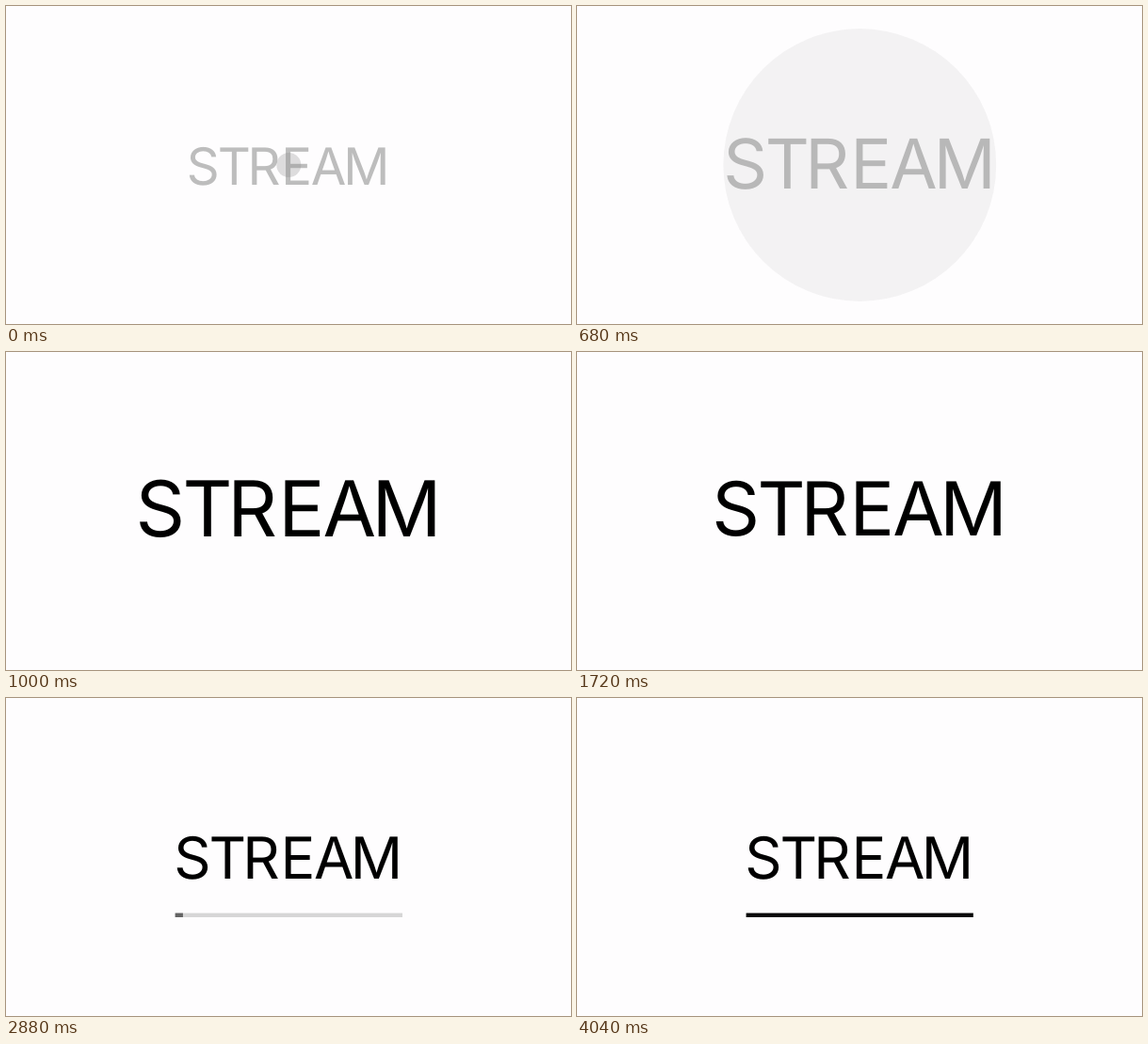
These frames come from a looping animation (600 by 338 pixels, 4960 ms). An HTML page:

```html
<!DOCTYPE html>
<html lang="en">
<head>
<meta charset="utf-8">
<title>Stream</title>
<style>
  html, body { margin: 0; width: 100%; height: 100%; overflow: hidden; background: #fefdfe; }
  svg { display: block; width: 100vw; height: 100vh; }
  text {
    font: 400 82px Inter, Roboto, sans-serif;
    font-optical-sizing: none;
    letter-spacing: -0.034em;
    text-anchor: middle;
    text-rendering: geometricPrecision;
  }
</style>
</head>
<body>
<svg viewBox="0 0 600 338">
  <g id="title"><text y="17.5" dx="0 .006em -.03em .048em .01em -.022em">STREAM</text></g>
  <circle id="ripple" cx="300.3" cy="169" fill="#8f8f8f"/>
  <rect id="track" x="180" y="228.6" width="241" height="4.4" fill="#d6d6d6"/>
  <rect id="bar" x="179.6" y="228.6" height="4.4"/>
</svg>
<script>
const LOOP = 4960, STEP = 40;
const SMALL = 208 / 313, MEDIUM = 234 / 313;
const [title, ripple, track, bar] =
  ["title", "ripple", "track", "bar"].map(id => document.getElementById(id));

const mix = (a, b, p) => a + (b - a) * p;
const span = (t, from, to) => Math.min(1, Math.max(0, (t - from) / (to - from)));
const set = (el, attrs) => {
  for (const name in attrs) el.setAttribute(name, attrs[name]);
};
const grey = v => {
  const n = Math.round(v);
  return `rgb(${n},${n},${n})`;
};

// Cubic Bezier easing, solved by bisection.
function bezier(x1, y1, x2, y2) {
  const at = (a, b, u) => 3 * a * u * (1 - u) ** 2 + 3 * b * u * u * (1 - u) + u ** 3;
  return x => {
    if (x <= 0 || x >= 1) return x;
    let lo = 0, hi = 1;
    for (let i = 0; i < 24; i++) {
      const mid = (lo + hi) / 2;
      if (at(x1, x2, mid) < x) lo = mid; else hi = mid;
    }
    return at(y1, y2, lo);
  };
}

const easeOut = bezier(0.22, 0.1, 0.25, 1);
const easeLate = bezier(0.75, 0, 0.75, 1);
const smooth = bezier(0.42, 0, 0.58, 1);

function render(t) {
  const grow = easeOut(span(t, 480, 1000));
  const shrink = easeLate(span(t, 1520, 2000));
  const scale = mix(mix(SMALL, 1, grow), MEDIUM, shrink);
  const ink = mix(189, 0, smooth(span(t, 680, 1000)));

  set(title, { transform: `translate(298.7 178.6) scale(${scale})`, fill: grey(ink) });
  set(ripple, { r: mix(13, 209, grow), opacity: 0.29 * (1 - grow) });
  set(track, { opacity: shrink ** 2 });
  set(bar, {
    width: 241.2 * span(t, 2840, 4000),
    fill: grey(mix(100, 8, span(t, 3960, 4040)))
  });
}

const start = performance.now();
function tick() {
  const t = (performance.now() - start) % LOOP;
  render(Math.floor(t / STEP) * STEP);
  requestAnimationFrame(tick);
}
tick();
</script>
</body>
</html>
```
